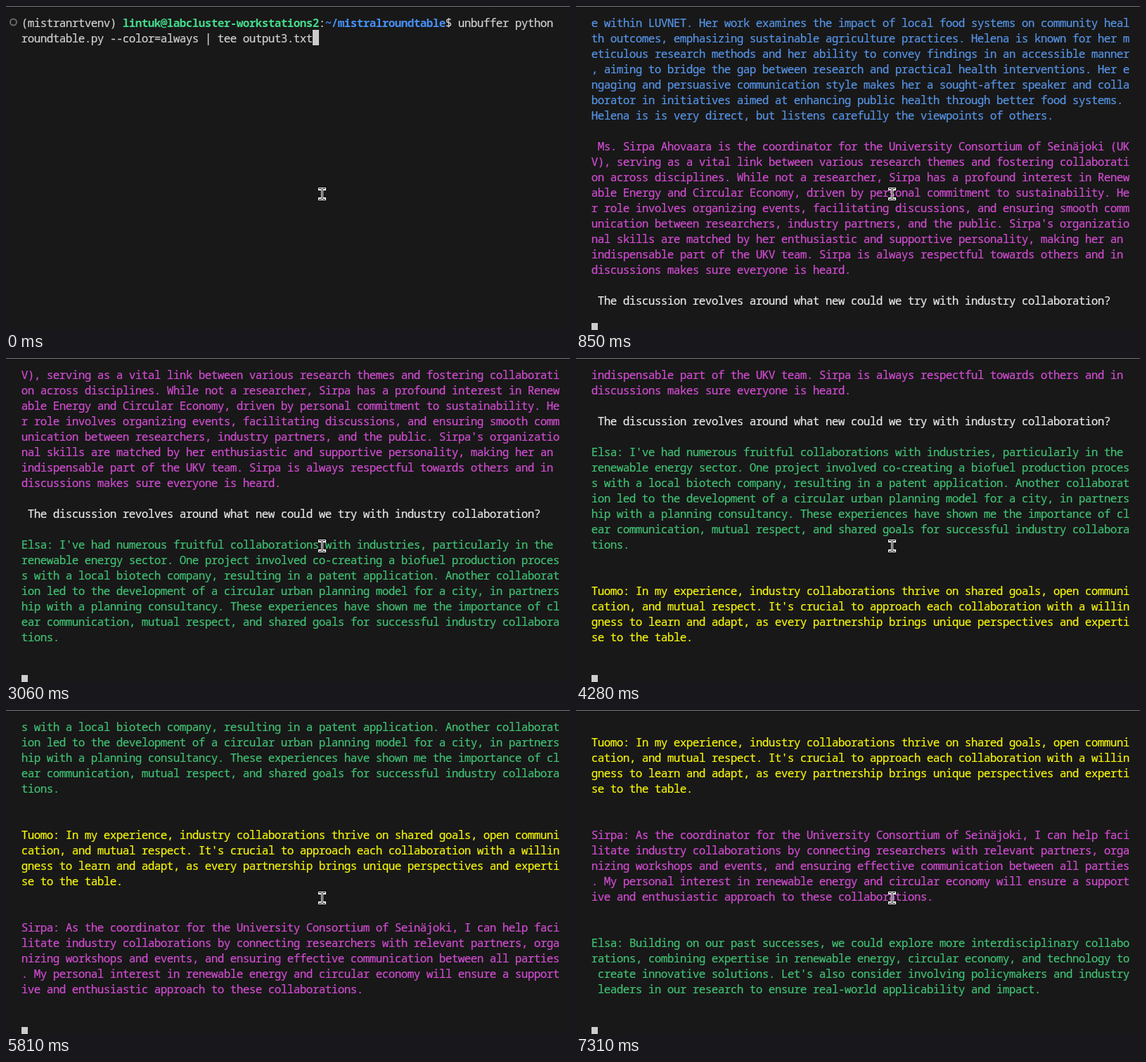
These frames come from a looping animation (802 by 462 pixels, 8 s). An HTML page:

```html
<!DOCTYPE html>
<html lang="en">
<head>
<meta charset="utf-8">
<title>Round table terminal</title>
<style>
  html, body { margin: 0; width: 100%; height: 100%; overflow: hidden; background: #181818; }
  svg { display: block; }
  text {
    font: 16px "Noto Sans Mono", "Liberation Mono", monospace;
    letter-spacing: -0.6px; white-space: pre; stroke-width: 0.2px;
  }
  .bold { font-weight: 700; stroke-width: 0; }
</style>
</head>
<body>
<svg width="802" height="462" viewBox="0 0 802 462">
  <rect width="802" height="462" fill="#181818"/>
  <rect width="802" height="1" fill="#747474"/>
  <circle id="mark" cx="10.5" cy="23" r="4.5" fill="none" stroke="#6a6a6a" stroke-width="2"/>
  <g id="rows"></g>
  <rect id="caret" width="9" height="22" fill="#cccccc"/>
  <g shape-rendering="crispEdges">
    <path d="M444 259h11v4h-4v10h4v4h-11v-4h4v-10h-4z" fill="#fff"/>
    <path d="M445 260h4v1h1v-1h4v1h-4v14h4v1h-4v-1h-1v1h-4v-1h4v-14h-4z" fill="#000"/>
  </g>
</svg>
<script>
const COLS = 85, CELL = 9, LINE = 22, LEFT = 22, TOP = 12, VISIBLE = 20, LOOP = 8000;
const GRAY = "#d0d0d0", WHITE = "#e8e8e8", BLUE = "#5694e6", PINK = "#d04cd0",
      GREEN = "#40c073", YELLOW = "#f5f50a", USER = "#44d98a", PATH = "#4690f5";

const command = [
  [["(mistranrtvenv) ", GRAY], ["lintuk@labcluster-workstations2", USER, true], [":", GRAY],
   ["~/mistralroundtable", PATH, true], ["$ unbuffer python", GRAY]],
  [["roundtable.py --color=always | tee output3.txt", GRAY]]
];

// Paragraphs: colour, blank lines after, text
const talk = [
  [BLUE, 1, "e within LUVNET. Her work examines the impact of local food systems on community health outcomes, emphasizing sustainable agriculture practices. Helena is known for her meticulous research methods and her ability to convey findings in an accessible manner, aiming to bridge the gap between research and practical health interventions. Her engaging and persuasive communication style makes her a sought-after speaker and collaborator in initiatives aimed at enhancing public health through better food systems. Helena is is very direct, but listens carefully the viewpoints of others."],
  [PINK, 1, " Ms. Sirpa Ahovaara is the coordinator for the University Consortium of Seinäjoki (UKV), serving as a vital link between various research themes and fostering collaboration across disciplines. While not a researcher, Sirpa has a profound interest in Renewable Energy and Circular Economy, driven by personal commitment to sustainability. Her role involves organizing events, facilitating discussions, and ensuring smooth communication between researchers, industry partners, and the public. Sirpa's organizational skills are matched by her enthusiastic and supportive personality, making her an indispensable part of the UKV team. Sirpa is always respectful towards others and in discussions makes sure everyone is heard."],
  [WHITE, 1, " The discussion revolves around what new could we try with industry collaboration?"],
  [GREEN, 2, "Elsa: I've had numerous fruitful collaborations with industries, particularly in the renewable energy sector. One project involved co-creating a biofuel production process with a local biotech company, resulting in a patent application. Another collaboration led to the development of a circular urban planning model for a city, in partnership with a planning consultancy. These experiences have shown me the importance of clear communication, mutual respect, and shared goals for successful industry collaborations."],
  [YELLOW, 2, "Tuomo: In my experience, industry collaborations thrive on shared goals, open communication, and mutual respect. It's crucial to approach each collaboration with a willingness to learn and adapt, as every partnership brings unique perspectives and expertise to the table."],
  [PINK, 2, "Sirpa: As the coordinator for the University Consortium of Seinäjoki, I can help facilitate industry collaborations by connecting researchers with relevant partners, organizing workshops and events, and ensuring effective communication between all parties. My personal interest in renewable energy and circular economy will ensure a supportive and enthusiastic approach to these collaborations."],
  [GREEN, 2, "Elsa: Building on our past successes, we could explore more interdisciplinary collaborations, combining expertise in renewable energy, circular economy, and technology to create innovative solutions. Let's also consider involving policymakers and industry leaders in our research to ensure real-world applicability and impact."]
];

// Hard wrap at the terminal width
function wrap([color, gap, text]) {
  const out = [];
  for (let i = 0; i < text.length; i += COLS) out.push([[text.slice(i, i + COLS), color]]);
  for (let i = 0; i < gap; i++) out.push([]);
  return out;
}

// The last full screen after the first n paragraphs
const after = n => ({
  lines: talk.slice(0, n).flatMap(wrap).slice(-VISIBLE), col: 0, row: VISIBLE
});

const scenes = [
  { at: 0, lines: command, col: 46, row: 1, mark: true },
  { at: 420, lines: command, col: 0, row: 2, mark: true },
  { at: 850, ...after(3) },
  { at: 3060, ...after(4) },
  { at: 4280, ...after(5) },
  { at: 5810, ...after(6) },
  { at: 7310, ...after(7) }
];

const $ = id => document.getElementById(id);
const rows = $("rows"), caret = $("caret"), mark = $("mark");

function make(tag, attrs, parent) {
  const el = document.createElementNS("http://www.w3.org/2000/svg", tag);
  for (const k in attrs) el.setAttribute(k, attrs[k]);
  return parent.appendChild(el);
}

function draw(scene) {
  rows.replaceChildren();
  scene.lines.forEach((line, r) => {
    let col = 0;
    for (const [text, color, bold] of line) {
      const lead = text.length - text.trimStart().length;
      make("text", {
        x: LEFT + (col + lead) * CELL - 0.3, y: TOP + r * LINE + 18,
        fill: color, stroke: color, class: bold ? "bold" : ""
      }, rows).textContent = text.trim();
      col += text.length;
    }
  });
  caret.setAttribute("x", LEFT + scene.col * CELL);
  caret.setAttribute("y", TOP + scene.row * LINE);
  mark.setAttribute("visibility", scene.mark ? "visible" : "hidden");
}

let shown = null;
function tick() {
  const t = performance.now() % LOOP;
  const scene = scenes.findLast(s => s.at <= t);
  if (scene !== shown) draw(shown = scene);
  requestAnimationFrame(tick);
}
tick();
</script>
</body>
</html>
```
